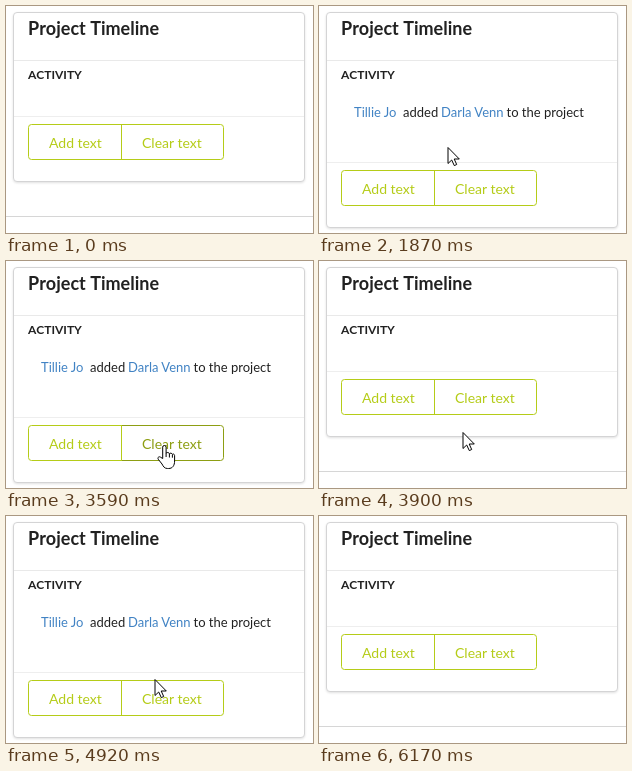
An HTML page that plays this animation: 307 px wide and 227 px high, repeating every 6950 ms.

```html
<!DOCTYPE html>
<html lang="en">
<head>
<meta charset="utf-8">
<title>Project Timeline</title>
<style>
  html, body { margin: 0; width: 100%; height: 100%; overflow: hidden; background: #fff; }
  svg { display: block; width: 307px; height: 227px; font-family: Lato, sans-serif; }

  /* One loop is 6950 ms, so 1% = 69.5 ms. */
  .lower, .card, .feed, .add, .clear, .cursor, .arrow, .hand {
    animation: 6.95s linear infinite;
  }
  .lower, .card, .feed, .arrow, .hand { animation-timing-function: step-end; }

  .card { height: 169px; fill: #fff; stroke: #d4d4d5; animation-name: grow;
          filter: drop-shadow(0 1px 1px rgba(0, 0, 0, .12)); }
  .rule { stroke: #e9e9e9; }
  .lower .rule { stroke: #eee; }
  .footer { stroke: #d6d6d6; }
  .title, .sub { font-weight: 700; font-kerning: none; }
  .title { font-size: 18px; }
  .sub { font-size: 12px; }
  .feed { font-size: 13px; animation-name: reveal; }
  .link { fill: #4183c4; }
  text { fill: #212121; }

  .lower { animation-name: shift; }
  .add, .clear { color: #b5cc18; font-size: 14px; }
  .add path, .clear path { fill: none; stroke: currentColor; }
  .add text, .clear text { fill: currentColor; }
  .add { animation-name: add; }
  .clear { animation-name: clear; }
  .divide { stroke: #b5cc18; }

  .cursor { fill: #fff; stroke: #000; stroke-linejoin: round; animation-name: travel; }
  .arrow { animation-name: arrow; }
  .hand { animation-name: hand; }

  @keyframes shift {
    0%, 52.81%, 79.71%, 100% { transform: translateY(0); }
    15.54%, 64.17% { transform: translateY(46px); }
  }
  @keyframes grow {
    0%, 52.81%, 79.71%, 100% { height: 169px; }
    15.54%, 64.17% { height: 215px; }
  }
  @keyframes reveal {
    0%, 52.81%, 79.71%, 100% { opacity: 0; }
    15.54%, 64.17% { opacity: 1; }
  }

  @keyframes add {
    0%, 11.08%, 17.84%, 59%, 66.47%, 100% { color: #b5cc18; }
    12.23%, 14.38%, 60.72%, 63.02% { color: #9caf12; }
    14.39%, 15.54%, 64.17% { color: #8d9e13; }
  }
  @keyframes clear {
    0%, 32.5%, 55%, 71.9%, 82%, 100% { color: #b5cc18; }
    34.8%, 51.64%, 74.2%, 78.55% { color: #9caf12; }
    51.65%, 52.81%, 78.56%, 79.71% { color: #8d9e13; }
  }

  @keyframes travel {
    0%     { transform: translate(139px, 222px); animation-timing-function: step-end; }
    6.62%  { transform: translate(139px, 222px); animation-timing-function: steps(2); }
    8.92%  { transform: translate(110px, 182px); animation-timing-function: steps(2); }
    11.08% { transform: translate(82px, 149px); animation-timing-function: step-end; }
    12.23% { transform: translate(77px, 141px); animation-timing-function: step-end; }
    22.45% { transform: translate(81px, 139px); animation-timing-function: steps(2); }
    24.75% { transform: translate(102px, 135px); animation-timing-function: steps(2); }
    26.91% { transform: translate(128px, 141px); animation-timing-function: steps(4); }
    31.37% { transform: translate(153px, 163px); animation-timing-function: step-end; }
    32.52% { transform: translate(154px, 168px); animation-timing-function: steps(4); }
    37.12% { transform: translate(157px, 184px); animation-timing-function: step-end; }
    52.81% { transform: translate(156px, 183px); animation-timing-function: steps(3); }
    56.12% { transform: translate(143px, 171px); animation-timing-function: steps(4); }
    60.72% { transform: translate(82px, 139px); animation-timing-function: step-end; }
    65.32% { transform: translate(85px, 139px); animation-timing-function: steps(5); }
    70.79% { transform: translate(148px, 163px); animation-timing-function: step-end; }
    71.94% { transform: translate(151px, 169px); animation-timing-function: steps(3); }
    75.40% { transform: translate(156px, 181px); animation-timing-function: step-end; }
    79.71% { transform: translate(159px, 182px); animation-timing-function: steps(7); }
    87.63%, 100% { transform: translate(274px, 222px); animation-timing-function: step-end; }
  }
  @keyframes arrow {
    0%, 11.08%, 32.52%, 59.57%, 71.94%, 88.78%, 100% { opacity: 0; }
    6.62%, 15.54%, 52.81%, 64.17%, 79.71% { opacity: 1; }
  }
  @keyframes hand {
    0%, 15.54%, 52.81%, 64.17%, 79.71%, 100% { opacity: 0; }
    11.08%, 32.52%, 59.57%, 71.94% { opacity: 1; }
  }
</style>
</head>
<body>
<svg viewBox="0 0 307 227">
  <rect class="card" x="7.5" y="6.5" width="291" rx="3.5"/>
  <text class="title" x="22" y="29">Project Timeline</text>
  <path class="rule" d="M8 54.5H298"/>
  <text class="sub" x="22" y="73">ACTIVITY</text>

  <g class="feed">
    <text class="link" x="35" y="111">Tillie Jo</text>
    <text x="84" y="111">added</text>
    <text class="link" x="122" y="111">Darla Venn</text>
    <text x="187.5" y="111">to the project</text>
  </g>

  <g class="lower">
    <path class="rule" d="M8 110.5H298"/>
    <path class="footer" d="M0 210.5H307"/>
    <g class="add">
      <path d="M115 118.5H25.5a3 3 0 0 0-3 3V150.5a3 3 0 0 0 3 3H115"/>
      <text x="43" y="142">Add text</text>
    </g>
    <g class="clear">
      <path d="M116 118.5H214.5a3 3 0 0 1 3 3V150.5a3 3 0 0 1-3 3H116"/>
      <text x="136" y="142">Clear text</text>
    </g>
    <path class="divide" d="M115.5 118V154"/>
  </g>

  <g class="cursor">
    <path class="arrow" d="M1 .5V16.5L4.7 13 7.3 18.6 9.7 17.5 7.2 12H12.3z"/>
    <g class="hand">
      <path d="M-.3 13.5V2.2a1.7 1.7 0 0 1 3.4 0V8.2c.3-1 3-1 3.3.5c.4-.9 2.7-.7 3 .7c.5-.8 2.2-.4 2.2 1.2V16c0 4.5-2 7.5-6 7.5H4.5c-3 0-4.2-2-5.5-4.5L-4.8 14.2c-1-2 1.2-3.2 2.6-1.8z"/>
      <path fill="none" d="M3.1 8v4M6.4 9v3.5M9.4 9.7v3"/>
    </g>
  </g>
</svg>
</body>
</html>
```
